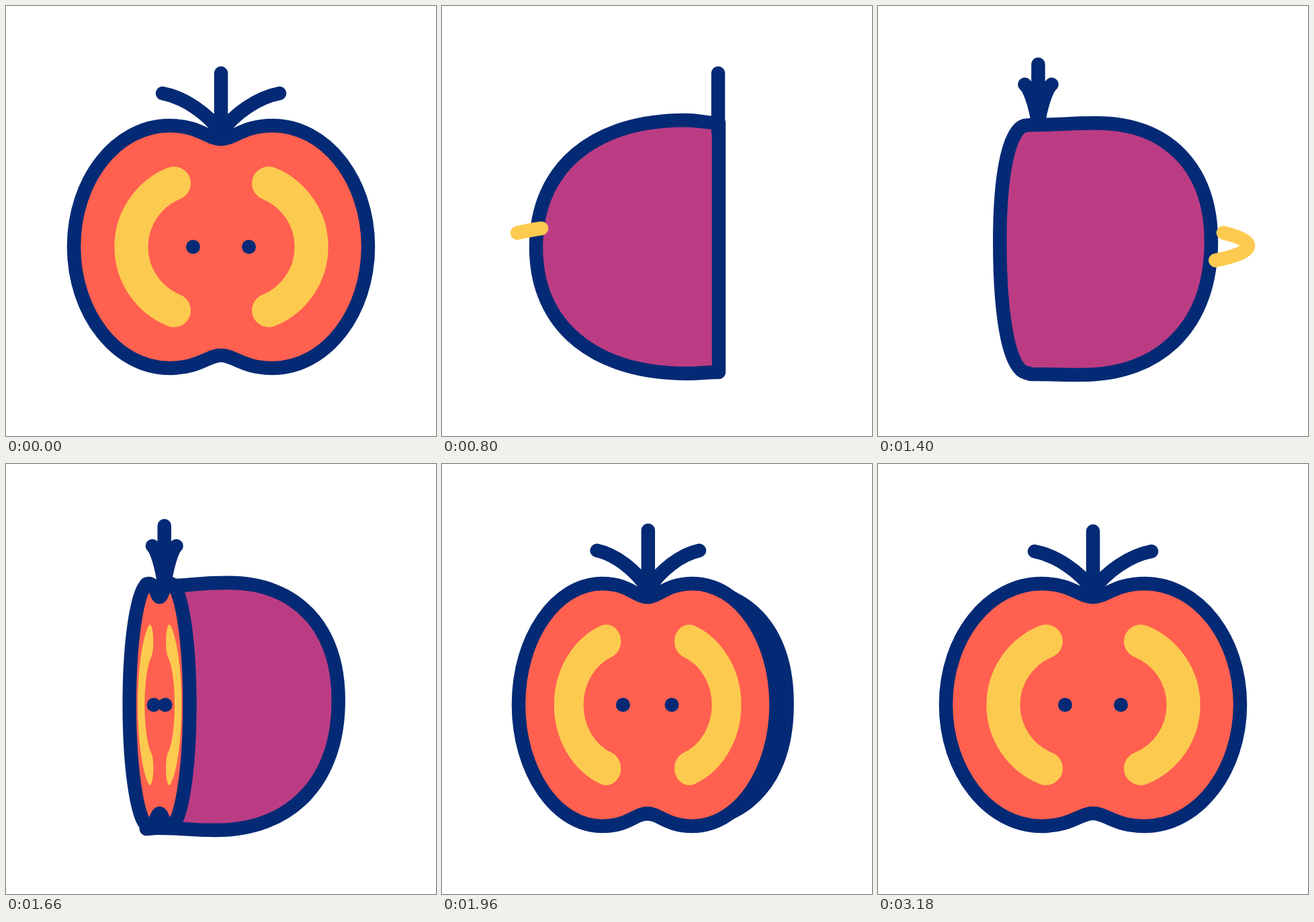
Recreate the animation shown at these times as an HTML page. Size 640 by 640 pixels, loop 3600 ms.

```html
<!DOCTYPE html>
<html lang="en">
<head>
<meta charset="utf-8">
<title>Turning fruit</title>
<style>
  html, body { margin: 0; width: 100%; height: 100%; overflow: hidden; background: #fff; }
  svg { display: block; width: 100%; height: 100%; }
  path { stroke-linecap: round; stroke-linejoin: round; }
  .line { stroke: #042a75; stroke-width: 20.5; fill: none; }
  .eye { fill: #042a75; }
  .seed { stroke: #fdca50; stroke-width: 50; fill: none; }
  #dome { fill: #bc3c84; }
  #flesh { fill: #ff6050; }
  #streak { stroke: #fdca50; stroke-width: 20.5; fill: none; }
</style>
</head>
<body>
<svg viewBox="0 0 640 640">
  <path id="dome" class="line"/>
  <path id="stem" class="line"/>
  <g id="face">
    <path id="flesh"/>
    <g id="seeds">
      <path class="seed" d="M251 264A102 102 0 0 0 251 453"/>
      <path class="seed" d="M392 264A102 102 0 0 1 392 453"/>
    </g>
    <path id="rim" class="line"/>
    <circle id="eyeL" class="eye" cy="358.5" r="10.5"/>
    <circle id="eyeR" class="eye" cy="358.5" r="10.5"/>
  </g>
  <path id="streak" pathLength="1" d="M148 331A237.5 36 0 1 0 479 331"/>
</svg>
<script>
const LOOP = 3600;
const $ = id => document.getElementById(id);
const [dome, stem, face, flesh, seeds, rim, eyeL, eyeR, streak] =
  ['dome', 'stem', 'face', 'flesh', 'seeds', 'rim', 'eyeL', 'eyeR', 'streak'].map($);

const mix = (a, b, p) => a + (b - a) * p;
const span = (t, from, to) => Math.min(1, Math.max(0, (t - from) / (to - from)));
const smooth = p => p * p * (3 - 2 * p);

// cubic-bezier(.3, 0, .3, 1)
function settle(x) {
  let lo = 0, hi = 1;
  for (let i = 0; i < 24; i++) {
    const s = (lo + hi) / 2;
    if (.9 * s * (1 - s) + s ** 3 < x) lo = s; else hi = s;
  }
  return smooth(lo);
}

// x: left, top-left, middle, top-right, right, bottom-left, bottom-right
// y: top-left, top-middle, top-right, sides, bottom-left, bottom-middle, bottom-right
const POSES = [
  [112, 265, 320, 320, 320, 265, 320, 186, 200, 200, 358, 532, 517, 517],
  [140, 362, 412, 412, 412, 365, 412, 170, 174, 178, 359, 547, 545, 545],
  [119, 295, 318, 345, 519, 300, 330, 176, 177, 175, 352, 550, 548, 549],
  [200, 200, 200, 320, 489, 200, 295, 178, 177, 174, 350, 545, 548, 549],
  [243, 243, 320, 375, 517, 243, 375, 182, 200, 188, 358, 535, 517, 530]
];
const TIMES = [445, 800, 1160, 1510, 2228];
const STEM_X = [320, 411, 320, 214, 320];
const STEM_Y = [0, 0, -24, -10, 0];
const FACE_X = [320, 412, 320, 205, 320];

function domePath([l, tl, m, tr, r, bl, br, ytl, ytm, ytr, ys, ybl, ybm, ybr]) {
  const k = .62;
  const wave = (x0, y0, x1, y1) => `C${(x0 + x1) / 2} ${y0} ${(x0 + x1) / 2} ${y1} ${x1} ${y1}`;
  const out = (x0, y0, x1, y1) => `C${mix(x0, x1, k)} ${y0} ${x1} ${mix(y1, y0, k)} ${x1} ${y1}`;
  const back = (x0, y0, x1, y1) => `C${x0} ${mix(y0, y1, k)} ${mix(x1, x0, k)} ${y1} ${x1} ${y1}`;
  return `M${tl} ${ytl}` + wave(tl, ytl, m, ytm) + wave(m, ytm, tr, ytr) +
    out(tr, ytr, r, ys) + back(r, ys, br, ybr) +
    wave(br, ybr, m, ybm) + wave(m, ybm, bl, ybl) +
    out(bl, ybl, l, ys) + back(l, ys, tl, ytl) + 'Z';
}

function rimPath(cx, s) {
  const x = d => cx + d * s;
  const side = n => `C${x(20 * n)} 198 ${x(32 * n)} 178 ${x(77 * n)} 178` +
    `C${x(155 * n)} 178 ${x(219 * n)} 258 ${x(219 * n)} 358` +
    `C${x(219 * n)} 458 ${x(155 * n)} 539 ${x(77 * n)} 539` +
    `C${x(32 * n)} 539 ${x(20 * n)} 520 ${cx} 520`;
  const top = `M${cx} 198`;
  return top + side(-1) + top + side(1);
}

function stemPath(cx, s, dy) {
  const leaf = n => {
    const x = d => cx + d * s * n;
    return `M${x(87)} ${130 + dy}C${x(55)} ${136 + dy} ${x(20)} ${160 + dy} ${cx} ${188 + dy}`;
  };
  return `M${cx} ${100 + dy}V${188 + dy}` + leaf(-1) + leaf(1);
}

function draw(t) {
  let i = 0;
  while (i < 3 && t >= TIMES[i + 1]) i++;
  const raw = span(t, TIMES[i], TIMES[i + 1]);
  const p = i === 3 ? settle(raw) : smooth(raw);
  const at = list => mix(list[i], list[i + 1], p);
  const scale = i % 2 ? p : 1 - p;

  const resting = t <= TIMES[0] || t >= TIMES[4];
  dome.style.display = resting ? 'none' : '';
  dome.setAttribute('d', domePath(POSES[i].map((v, j) => mix(v, POSES[i + 1][j], p))));
  stem.setAttribute('d', stemPath(at(STEM_X), scale, at(STEM_Y)));

  face.style.display = i === 1 || i === 2 ? 'none' : '';
  const cx = at(FACE_X);
  // the rim trails the inner parts a little when turning away
  const lag = i === 0 ? p ** 1.12 : p;
  const outline = rimPath(mix(FACE_X[i], FACE_X[i + 1], lag), i % 2 ? lag : 1 - lag);
  flesh.setAttribute('d', outline);
  rim.setAttribute('d', outline);
  seeds.setAttribute('transform', `translate(${cx} 0) scale(${scale} 1) translate(-321 0)`);
  eyeL.setAttribute('cx', cx - 41.5 * scale);
  eyeR.setAttribute('cx', cx + 41.5 * scale);

  const head = smooth(span(t, 680, 1520));
  const tail = smooth(span(t, 970, 1580));
  streak.style.display = head - tail > .003 ? '' : 'none';
  streak.setAttribute('stroke-dasharray', `${head - tail} 3`);
  streak.setAttribute('stroke-dashoffset', -tail);
}

function tick() {
  draw(performance.now() % LOOP);
  requestAnimationFrame(tick);
}
tick();
</script>
</body>
</html>
```
